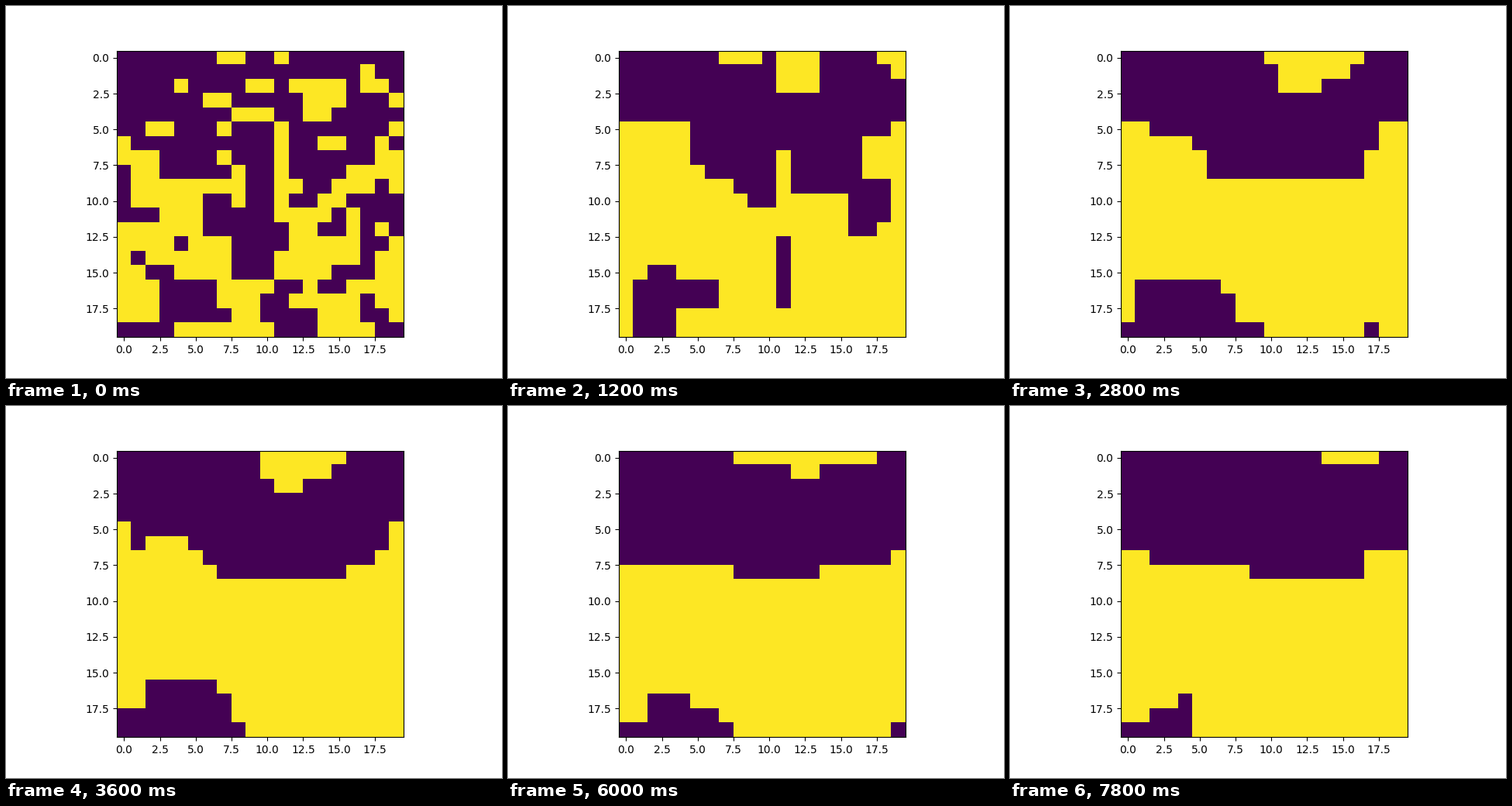
Animation, 640 px wide and 480 px high, one loop 8 s. Source, as a matplotlib script:

```python
"""Ising-style spin lattice that coarsens from noise into two broad domains."""
import math

import matplotlib.pyplot as plt
import numpy as np
from matplotlib.animation import FuncAnimation

SIZE = 20
INTERVAL = 200
UP, DOWN = 1, -1
rng = np.random.default_rng(7)


def steps(points):
    """Expand (first column, value) pairs to one value per column."""
    cols, values = np.array(points).T
    return values[np.searchsorted(cols, np.arange(SIZE), side="right") - 1]


def domains(island, front, floor):
    """Up spins hang from the top edge and lie between front and floor."""
    row = np.arange(SIZE)[:, None]
    inside = (row < steps(island)) | ((row >= steps(front)) & (row < steps(floor)))
    return np.where(inside, UP, DOWN)


def neighbours(grid):
    return sum(np.roll(grid, d, axis) for d in (-1, 1) for axis in (0, 1))


def noisy(grid, bias=0.55, blur=0.3):
    """Bury a lattice in slightly clumped random noise."""
    noise = rng.normal(size=grid.shape)
    field = noise + blur * neighbours(noise) + bias * grid
    return np.where(field > 0, UP, DOWN)


def relax(grid, goal, count):
    """Yield count lattices leading to goal, cheapest spin flips first."""
    grid = grid.copy()
    for left in range(count, 0, -1):
        for _ in range(math.ceil(np.sum(grid != goal) / left)):
            cost = grid * neighbours(grid) + rng.normal(0, 1, grid.shape)
            cost[grid == goal] = np.inf
            spot = np.unravel_index(np.argmin(cost), grid.shape)
            grid[spot] *= -1
        yield grid.copy()


def build_history():
    ragged = domains(
        island=[(0, 0), (7, 1), (10, 0), (11, 3), (14, 0), (18, 1), (19, 2)],
        front=[(0, 5), (5, 8), (6, 9), (8, 10), (9, 11), (11, 7), (12, 10),
               (16, 13), (18, 12), (19, 5)],
        floor=[(0, 20), (1, 16), (2, 15), (4, 20)])
    ragged[6:9, 17:19] = UP
    ragged[16:18, 4:7] = DOWN
    ragged[13:18, 11] = DOWN
    smooth = domains(
        island=[(0, 0), (10, 1), (11, 3), (14, 2), (16, 1), (17, 0)],
        front=[(0, 5), (2, 6), (5, 7), (6, 9), (17, 7), (18, 5)],
        floor=[(0, 19), (1, 16), (7, 17), (8, 19), (10, 20), (17, 19),
               (18, 20)])
    flatter = domains(
        island=[(0, 0), (9, 1), (10, 2), (15, 0)],
        front=[(0, 6), (1, 7), (4, 8), (7, 9), (15, 8), (18, 7)],
        floor=[(0, 18), (2, 16), (7, 18), (8, 20), (18, 19), (19, 18)])
    flat = domains(
        island=[(0, 0), (8, 1), (12, 2), (14, 1), (18, 0)],
        front=[(0, 8), (8, 9), (14, 8), (19, 7)],
        floor=[(0, 19), (2, 17), (5, 18), (7, 19), (8, 20), (19, 19)])
    final = domains(
        island=[(0, 0), (14, 1), (18, 0)],
        front=[(0, 7), (2, 8), (9, 9), (17, 7)],
        floor=[(0, 19), (2, 18), (4, 17), (5, 20)])

    history = [noisy(ragged)]
    stages = [(ragged, 6), (smooth, 8), (flatter, 9), (flat, 7), (final, 9)]
    for goal, count in stages:
        history.extend(relax(history[-1], goal, count))
    return history


history = build_history()

fig, ax = plt.subplots(figsize=(6.4, 4.8), dpi=100)
image = ax.imshow(history[0], cmap="viridis", vmin=DOWN, vmax=UP)


def draw(i):
    image.set_data(history[i])
    return (image,)


anim = FuncAnimation(fig, draw, frames=len(history), interval=INTERVAL,
                     repeat=True, repeat_delay=0)
plt.show()
```
